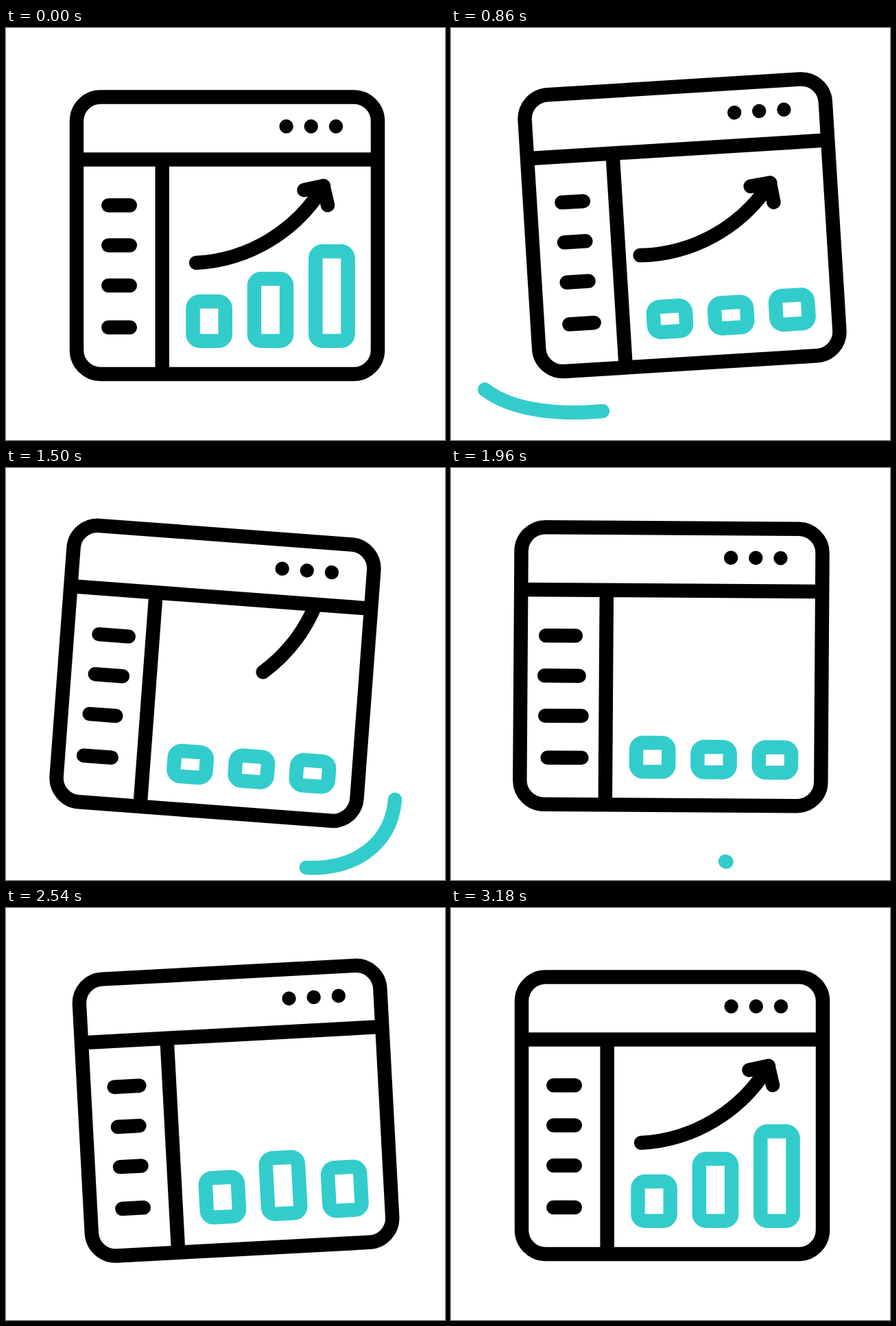
An HTML page for the animation above (3300 ms loop, 640 px wide and 600 px high).

```html
<!DOCTYPE html>
<html lang="en">
<head>
<meta charset="utf-8">
<title>Growth dashboard</title>
<style>
  html, body { margin: 0; width: 100%; height: 100%; overflow: hidden; background: #fff; }
  svg { display: block; width: 640px; height: 600px; }
  .line { fill: none; stroke: #000; stroke-width: 20.5; stroke-linecap: round; stroke-linejoin: round; }
  .teal { stroke: #3cc; }
</style>
</head>
<body>
<svg viewBox="0 0 640 600">
  <defs>
    <clipPath id="view"><rect id="viewRect" x="236" width="400"/></clipPath>
  </defs>
  <path id="sweepL" class="line teal" pathLength="1" d="M45 523C85 558 160 564 221 558"/>
  <path id="sweepR" class="line teal" pathLength="1" d="M567 483C562 545 512 585 439 582C425 581 412 577 400 573"/>
  <g id="win">
    <g id="bars"></g>
    <g clip-path="url(#view)">
      <path id="arrow" class="line" d="M277 342A231 231 0 0 0 463 230M434.5 236L462.5 230L469 258"/>
    </g>
    <rect class="line" x="103" y="100.5" width="439" height="403.5" rx="35"/>
    <path class="line" style="stroke-linecap:butt" d="M103 191.5H542M227.7 191V504"/>
    <g id="dots"></g>
    <g id="menu"></g>
  </g>
</svg>
<script>
const LOOP = 3300;
const FLAT = 57.5;
const $ = id => document.getElementById(id);

function set(el, attrs) {
  for (const key in attrs) el.setAttribute(key, attrs[key]);
}

function add(parent, tag, attrs) {
  const el = document.createElementNS('http://www.w3.org/2000/svg', tag);
  set(el, attrs);
  return $(parent).appendChild(el);
}

// Eases from 0 to 1 between two times.
function ramp(t, from, to) {
  const p = Math.min(1, Math.max(0, (t - from) / (to - from)));
  return (1 - Math.cos(Math.PI * p)) / 2;
}

// Eased value at time t through [time, value] key points.
function track(t, keys) {
  let value = keys[0][1];
  for (let i = 1; i < keys.length; i++) {
    value += (keys[i][1] - keys[i - 1][1]) * ramp(t, keys[i - 1][0], keys[i][0]);
  }
  return value;
}

// Smooth bump from 0 to 1 and back around a peak time.
const bump = (t, peak, half) => ramp(t, peak - half, peak) - ramp(t, peak, peak + half);

const swing = [[420, 0], [970, -3.9], [1590, 4.7], [2330, -3.9], [3020, 0]];
const bob = [[260, 0], [770, -15], [1480, -2.7], [2130, -15], [2900, 0]];
const leave = [[300, 0], [860, 5.5], [1300, 5.5], [1700, -80]];
const enter = [[2600, 95], [2950, -58], [3180, 0]];

const bars = [78, 111, 151].map((tall, i) => ({
  tall,
  el: add('bars', 'rect', { class: 'line teal', x: 272.5 + 89.4 * i, width: 47.2, rx: 10 })
}));
const dots = [0, 1, 2].map(i => add('dots', 'circle', { cx: 408.6 + 36.2 * i, cy: 143.2 }));
const menu = [258.3, 316.6, 375, 436].map(y => ({ y, el: add('menu', 'path', { class: 'line' }) }));

function drawBars(t) {
  bars.forEach(({ tall, el }, i) => {
    const shrink = ramp(t, 380 + 70 * i, 780 + 70 * i);
    const grow = ramp(t, 1760 + 230 * i, 2350 + 390 * i);
    const height = tall - (tall - FLAT) * (shrink - grow) - 20.5;
    set(el, { y: 455.7 - height, height });
  });
}

function drawDots(t) {
  const glow = ramp(t, 900, 1080) - ramp(t, 1240, 1420);
  const fill = `rgb(${51 * glow},${204 * glow},${204 * glow})`;
  for (const dot of dots) set(dot, { r: 10.2 + 1.4 * glow, fill });
}

// Lower lines stretch first; the wave climbs up the list.
function drawMenu(t) {
  menu.forEach(({ y, el }, i) => {
    const late = t + 117 * i;
    const right = 12.5 * (bump(late, 1440, 400) + bump(late, 2260, 420));
    const left = 11.5 * bump(t + 145 * i, 2110, 600);
    set(el, { d: `M${149.3 - left} ${y}H${180.8 + right}` });
  });
}

function drawArrow(t) {
  const entering = t >= 2600;
  const top = entering ? -100 : 191;
  set($('viewRect'), { y: top, height: 504 - top });
  set($('arrow'), {
    transform: `rotate(${track(t, entering ? enter : leave)} 266 150)`,
    visibility: t > 1700 && !entering ? 'hidden' : 'visible'
  });
}

function drawSweep(el, t, draw, drawn, wipe, wiped) {
  const start = ramp(t, wipe, wiped), end = ramp(t, draw, drawn);
  set(el, {
    visibility: t > draw && t < wiped ? 'visible' : 'hidden',
    'stroke-dasharray': `${Math.max(end - start, 0.001)} 3`,
    'stroke-dashoffset': -start
  });
}

function render(t) {
  set($('win'), { transform: `translate(0 ${track(t, bob)}) rotate(${track(t, swing)} 322.5 67)` });
  drawBars(t);
  drawDots(t);
  drawMenu(t);
  drawArrow(t);
  drawSweep($('sweepL'), t, 400, 700, 820, 1190);
  drawSweep($('sweepR'), t, 1320, 1570, 1640, 1980);
}

const began = performance.now();
function tick() {
  render((performance.now() - began) % LOOP);
  requestAnimationFrame(tick);
}
tick();
</script>
</body>
</html>
```
